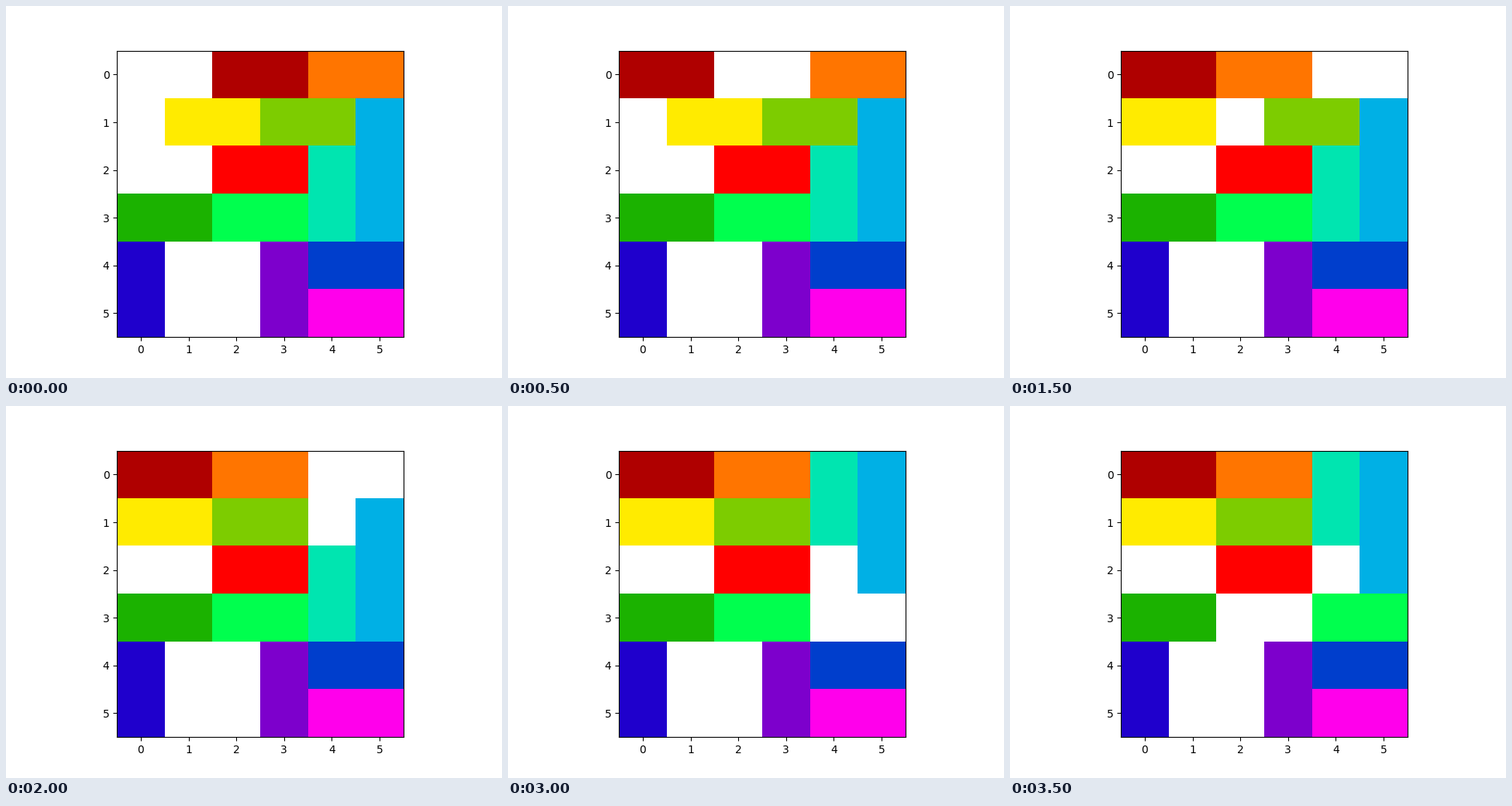
A matplotlib script for the animation above (4 s loop, 640x480 px).

```python
from colorsys import hsv_to_rgb

import matplotlib.pyplot as plt
import numpy as np
from matplotlib.animation import FuncAnimation

SIZE = 6
HUES = 13
STEP_MS = 500

# name: (hue index, brightness, row, column, height, width)
CARS = {
    "red": (0, 1.0, 2, 2, 1, 2),
    "maroon": (0, 0.69, 0, 2, 1, 2),
    "orange": (1, 1.0, 0, 4, 1, 2),
    "yellow": (2, 1.0, 1, 1, 1, 2),
    "lime": (3, 0.8, 1, 3, 1, 2),
    "green": (4, 0.7, 3, 0, 1, 2),
    "mint": (5, 1.0, 3, 2, 1, 2),
    "teal": (6, 0.9, 2, 4, 2, 1),
    "sky": (7, 0.9, 1, 5, 3, 1),
    "blue": (8, 0.8, 4, 4, 1, 2),
    "indigo": (9, 0.8, 4, 0, 2, 1),
    "purple": (10, 0.8, 4, 3, 2, 1),
    "magenta": (11, 1.0, 5, 4, 1, 2),
}

# One slide per step: (car, rows down, columns right)
MOVES = [
    ("maroon", 0, -2),
    ("orange", 0, -2),
    ("yellow", 0, -1),
    ("lime", 0, -1),
    ("teal", -2, 0),
    ("sky", -1, 0),
    ("mint", 0, 2),
]


def board(step):
    """Return the board as RGB cells after the first `step` moves."""
    shift = {car: (down, right) for car, down, right in MOVES[:step]}
    cells = np.ones((SIZE, SIZE, 3))
    for name, (hue, value, row, col, height, width) in CARS.items():
        down, right = shift.get(name, (0, 0))
        row, col = row + down, col + right
        cells[row:row + height, col:col + width] = hsv_to_rgb(hue / HUES, 1, value)
    return cells


fig, ax = plt.subplots(figsize=(6.4, 4.8), dpi=100)
image = ax.imshow(board(0), interpolation="nearest")
ax.set_xticks(range(SIZE))
ax.set_yticks(range(SIZE))


def update(step):
    image.set_data(board(step))
    return [image]


anim = FuncAnimation(
    fig,
    update,
    frames=len(MOVES) + 1,
    init_func=lambda: update(0),
    interval=STEP_MS,
    repeat=True,
    repeat_delay=0,
)

plt.show()
```
